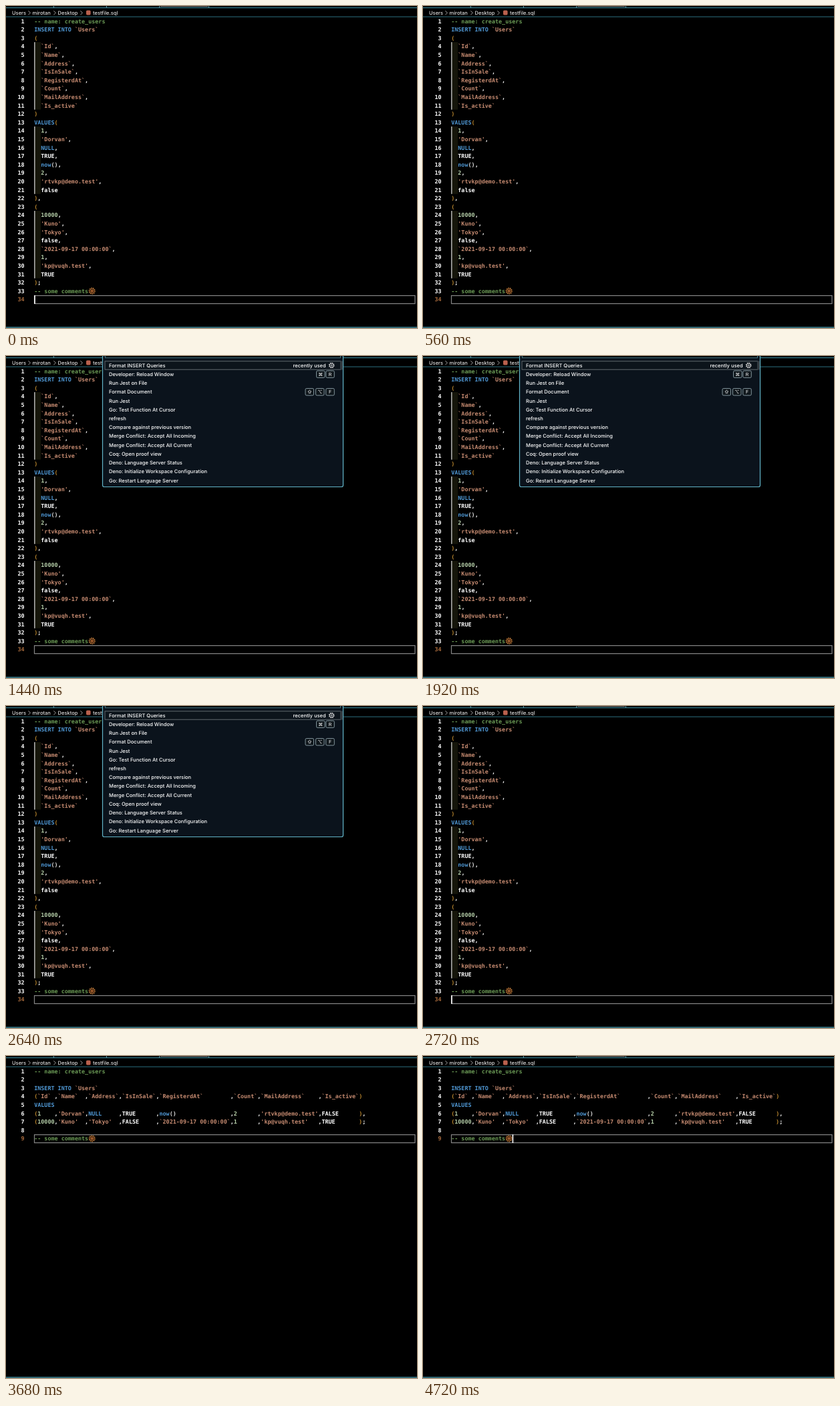
Write an HTML page that moves like this. It is 615 by 481 pixels and loops after 4800 ms.

```html
<!DOCTYPE html>
<html lang="en">
<head>
<meta charset="utf-8">
<style>
html, body { margin: 0; width: 100%; height: 100%; overflow: hidden; background: #000; }
svg { display: block; }
text { white-space: pre; text-rendering: geometricPrecision; fill: #fff; }
.code { font: bold 8.417px "DejaVu Sans Mono", monospace; }
.ui { font: 500 7.55px Inter, sans-serif; }
.num { text-anchor: end; }
.key { font: 7px Inter, "DejaVu Sans", sans-serif; text-anchor: middle; }
</style>
</head>
<body>
<svg id="stage" width="615" height="481" viewBox="0 0 615 481"></svg>
<script>
const LOOP = 4800, LINE = 12.6, CHAR = 5.067, LEFT = 42.2, ROW = 13.22;

const before = `-- name: create_users
INSERT INTO \`Users\`
(
  \`Id\`,
  \`Name\`,
  \`Address\`,
  \`IsInSale\`,
  \`RegisterdAt\`,
  \`Count\`,
  \`MailAddress\`,
  \`Is_active\`
)
VALUES(
  1,
  'Dorvan',
  NULL,
  TRUE,
  now(),
  2,
  'rtvkp@demo.test',
  false
),
(
  10000,
  'Kuno',
  'Tokyo',
  false,
  \`2021-09-17 00:00:00\`,
  1,
  'kp@vuqh.test',
  TRUE
);
-- some comments
`.split('\n');

// Pads every cell to the width of its column.
const widths = [5, 8, 9, 10, 21, 7, 17, 11];
const record = cells => '(' + cells.split('|').map((c, i) => c.padEnd(widths[i])).join(',') + ')';
const after = [
  '-- name: create_users', '', 'INSERT INTO `Users`',
  record('`Id`|`Name`|`Address`|`IsInSale`|`RegisterdAt`|`Count`|`MailAddress`|`Is_active`'),
  'VALUES',
  record("1|'Dorvan'|NULL|TRUE|now()|2|'rtvkp@demo.test'|FALSE") + ',',
  record("10000|'Kuno'|'Tokyo'|FALSE|`2021-09-17 00:00:00`|1|'kp@vuqh.test'|TRUE") + ';',
  '', '-- some comments'
];

const colors = { comment: '#6a9955', string: '#c58a70', keyword: '#4f97d3', number: '#b5cea8', call: '#ddd', bracket: '#b8842c' };
const token = /(?<comment>--.*)|(?<string>'[^']*'|`[^`]*`)|(?<keyword>INSERT INTO|VALUES|NULL|now)|(?<number>\d+)|(?<call>(?<=now)\(\))|(?<bracket>[()])/g;

const highlight = line => line.replace(token, (part, ...args) => {
  const groups = args.at(-1);
  const kind = Object.keys(groups).find(k => groups[k]);
  return `<tspan style="fill:${colors[kind]}">${part}</tspan>`;
});

const label = (x, y, s, attrs = 'class="ui"') => `<text x="${x}" y="${y}" ${attrs}>${s}</text>`;
const rect = (x, y, w, h, fill, attrs = '') => `<rect x="${x}" y="${y}" width="${w}" height="${h}" fill="${fill}" ${attrs}/>`;
const lineTop = n => 16.2 + LINE * (n - 1);

function editor(lines, guides) {
  const last = lines.length;
  const noted = lines.findLastIndex(s => s.startsWith('--')) + 1;
  const guide = ([from, to]) => {
    const y = lineTop(from), h = lineTop(to + 1) - y;
    return rect(LEFT, y, 10, h, '#15150a') + rect(LEFT, y, 1.3, h, '#ccc');
  };
  const code = lines.map((s, i) => {
    const y = lineTop(i + 1) + 9.4;
    const color = i + 1 === last ? '#a86a3c' : '#fff';
    return label(27.5, y, i + 1, `class="code num" style="fill:${color}"`) +
      label(LEFT, y, highlight(s), 'class="code"');
  }).join('');
  const flower = `<g transform="translate(128.7 ${lineTop(noted) + 6.3})">
    <circle r="4.1" fill="#4a2810" stroke="#b07236" stroke-width="2" stroke-dasharray="1.5 1"/>
    <circle r="2" fill="#9c5a2c"/></g>`;
  return guides.map(guide).join('') + code + flower +
    rect(42.5, lineTop(last) + .6, 569.5, 12, 'none', 'stroke="#858585" stroke-width="1.2"');
}

const commands = ['Format INSERT Queries', 'Developer: Reload Window', 'Run Jest on File', 'Format Document',
  'Run Jest', 'Go: Test Function At Cursor', 'refresh', 'Compare against previous version',
  'Merge Conflict: Accept All Incoming', 'Merge Conflict: Accept All Current', 'Coq: Open proof view',
  'Deno: Language Server Status', 'Deno: Initialize Workspace Configuration', 'Go: Restart Language Server'];

const keycap = (x, row, s) => {
  const y = 14 + ROW * row;
  return rect(x, y - 5.2, 12.5, 10.4, '#10171c', 'rx="1.8" stroke="#9fb4bb" stroke-width=".8"') +
    label(x + 6.25, y + 2.6, s, 'class="key"');
};

const palette = rect(144.5, -10, 360, 205.5, '#0b131c', 'rx="2.5" stroke="#62b4c8" stroke-width="1.2"') +
  rect(148.5, -10, 352, 12.7, '#000', 'stroke="#4c8794" stroke-width=".9"') +
  rect(148, 7.8, 353, 12.4, '#0c141b', 'stroke="#6a7379" stroke-width=".9"') +
  rect(500, 7.5, 4, 13, '#333c42') +
  commands.map((s, i) => label(154, 16.7 + ROW * i, s)).join('') +
  label(429.5, 16.7, 'recently used') +
  `<g transform="translate(487.2 14)" fill="none" stroke="#ddd">
    <circle r="3.7" stroke-width="1.2" stroke-dasharray="1.7 1.2"/>
    <circle r="2.9" stroke-width=".8"/><circle r="1.1" stroke-width=".8"/></g>` +
  keycap(464.5, 1, '⌘') + keycap(478.8, 1, 'R') +
  keycap(448, 3, '⇧') + keycap(463.5, 3, '⌥') + keycap(478.8, 3, 'F');

const chevron = x => `<path d="M${x - 1.6} 7.2l3 3l-3 3" fill="none" stroke="#bbb" stroke-width=".9"/>`;
const chrome = rect(0, 2, 615, 1.2, '#347f90') + rect(0, 15.6, 615, 1, '#2b6f7f') +
  rect(0, 479.3, 615, 1.4, '#3f8c9e') + rect(231, 0, 71, 1, '#777') +
  [71, 150, 229, 303].map(x => rect(x, 0, 1, 3, '#5b98a5')).join('') +
  [[9, 'Users'], [39.5, 'mirotan'], [77.5, 'Desktop'], [130, 'testfile.sql']]
    .map(([x, s]) => label(x, 13, s, 'class="ui" style="fill:#ddd"')).join('') +
  [35, 73, 113].map(chevron).join('') +
  rect(120, 6.4, 6.6, 7, '#b9604d', 'rx="1.6"');

document.getElementById('stage').innerHTML = chrome +
  `<g id="raw">${editor(before, [[4, 11], [14, 21], [24, 31]])}</g>
   <g id="tidy">${editor(after, [])}</g>
   <g id="palette">${palette}</g>` + rect(0, 0, 1.6, 12.8, '#fff', 'id="caret"');

const [raw, tidy, menu, caret] = ['raw', 'tidy', 'palette', 'caret'].map(id => document.getElementById(id));
const show = (el, on) => el.setAttribute('visibility', on ? 'visible' : 'hidden');
const started = performance.now();

function draw() {
  const t = (performance.now() - started) % LOOP;
  const done = t >= 2800;
  const blink = t < 480 || (t >= 2710 && (t - 2710) % 1000 < 500);
  show(raw, !done);
  show(tidy, done);
  show(menu, t >= 950 && t < 2710);
  show(caret, blink);
  caret.setAttribute('x', done ? LEFT + CHAR * 18 + .2 : LEFT);
  caret.setAttribute('y', lineTop(done ? after.length : before.length) + .2);
  requestAnimationFrame(draw);
}
draw();
</script>
</body>
</html>
```
